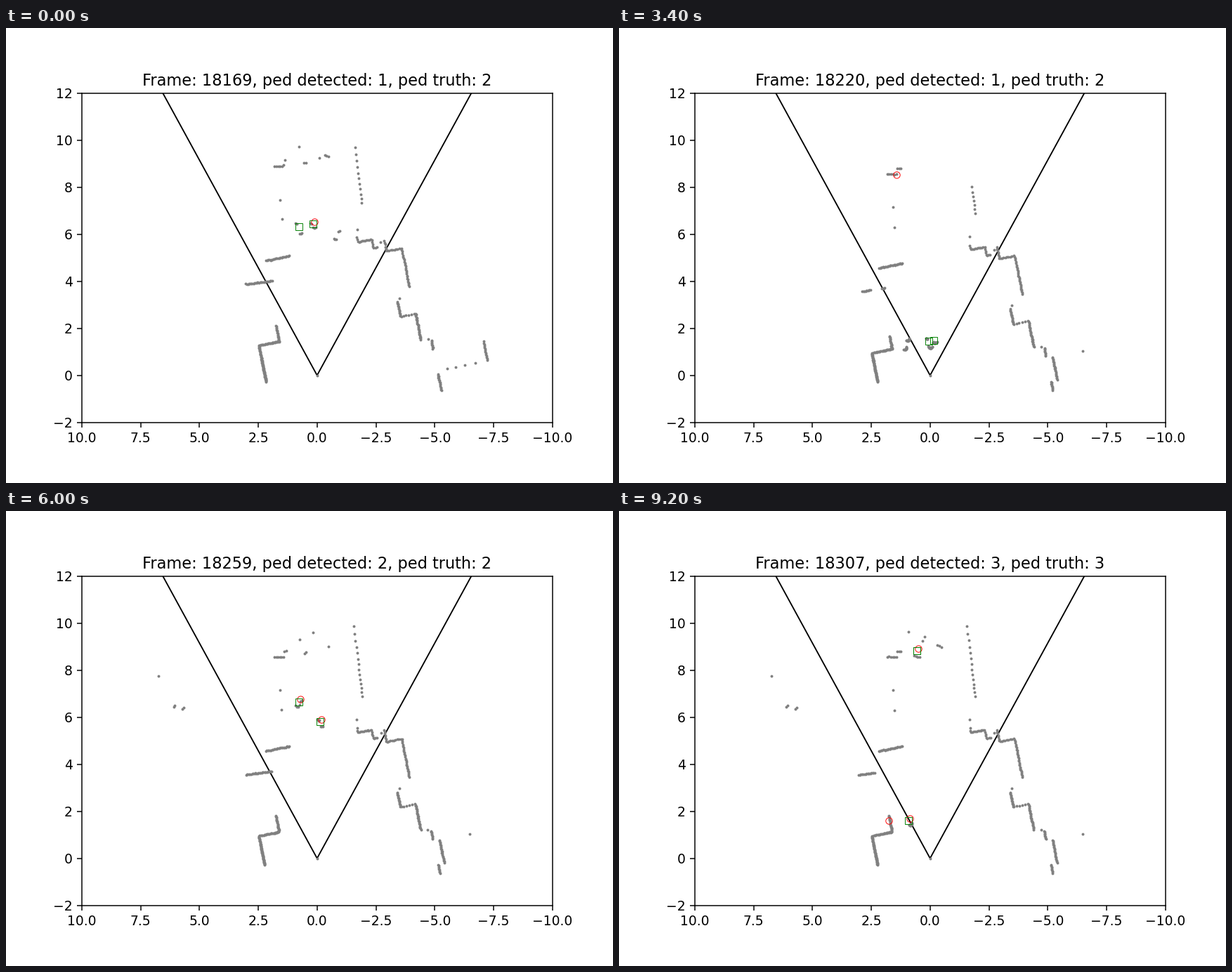
A matplotlib script for the animation above (9.27 s loop, 864 by 648 pixels).

```python
import numpy as np
import matplotlib.pyplot as plt
from matplotlib.animation import FuncAnimation

LOOP, TICK = 9270, 30
FIRST_SCAN = 18169

# The scanner sends one ray every half degree; x grows to the left.
DEG = np.arange(-97, 97.1, .5)
RAYS = np.column_stack([np.sin(np.radians(DEG)), np.cos(np.radians(DEG))])

LABEL_AGE, FOUND_AGE = 2, 10      # scans before a person is marked
LAG = np.array([-.05, .10])       # detector bias
VIEW = .62                        # widest x / y that gets a label
LEG = .09


def wall(x, y, *steps, tilt=.2):
    """Segments from a corner, alternately towards the sensor and rightwards."""
    down = np.array([-tilt, -1]) / np.hypot(tilt, 1)
    right = np.array([-1, tilt]) / np.hypot(tilt, 1)
    corners = [np.array([x, y])]
    for i, s in enumerate(steps):
        corners.append(corners[-1] + s * (right if i % 2 else down))
    return list(zip(corners, corners[1:]))


ROOM = (wall(2.20, 4.56, 0, 1.06)
        + wall(3.07, 3.55, 0, 1.17, tilt=.13)
        + wall(1.76, 1.84, .73, -.88, 1.6)
        + wall(-2.84, 5.48, .53, .66, 1.69)
        + wall(-1.68, 5.60, .25, .60, .38, .20)
        + wall(-3.41, 2.82, .65, .66, 1.15)
        + wall(-4.84, 1.20, .40)
        + wall(-5.14, -.25, .76)
        + wall(-5.60, .85, 0, 1.5, .85, -1.75)
        + wall(-1.56, 9.90, 3.05, tilt=.117)
        + wall(1.84, 8.56, 0, .42, -.25, .26, tilt=0)
        + wall(.56, 8.72, 0, .14)
        + wall(-.30, 9.06, 0, .25, tilt=-.35)
        + wall(6.12, 6.42, 0, .15, tilt=1))
POSTS = [(6.78, 7.80), (5.71, 6.40), (1.58, 7.19), (1.50, 6.32),
         (-1.71, 5.90), (-2.72, 5.36), (-3.50, 2.97), (-4.75, 1.22)]

# Paths of people as (scan, x, y).
WALKERS = [
    [(-4, .79, 6.08), (42, .57, 8.75)],
    [(-31, .29, 4.59), (44, 0, 9.07)],
    [(0, -.83, 6.03), (38, -1.25, 2.03)],
    [(20, 2.20, -.10), (36, 1.75, .55)],
    [(45, 0, .79), (66, .17, 3.10), (90, -.13, 5.81), (121, .14, 8.60),
     (138, .56, 8.83)],
    [(47, -.20, 1.10), (58, -.10, 2.15)],
    [(49, .95, 1.50), (72, 1.85, 0)],
    [(72, .72, 8.55), (138, .92, 1.60)],
    [(130, .70, 8.95), (138, .56, 8.83)],
]
FALSE_ALARMS = [(48, 53, (1.43, 8.53)), (136, 138, (1.76, 1.59))]


def people(k, age=0):
    """Places of those who have been around for at least `age` scans."""
    places = []
    for path in WALKERS:
        ks, xs, ys = zip(*path)
        if ks[0] + age <= k <= ks[-1]:
            places.append(np.array([np.interp(k, ks, xs),
                                    np.interp(k, ks, ys)]))
    return places


def legs(k):
    feet = []
    for i, p in enumerate(people(k)):
        swing = np.array([.06, .2 * np.sin(.5 * k + 1.3 * i + 1.4)])
        feet += [p + swing, p - swing]
    return feet


def cross(a, b):
    return a[..., 0] * b[..., 1] - a[..., 1] * b[..., 0]


def hit_walls(segments, shift):
    p, q = np.array(segments).transpose(1, 0, 2) + [0, shift]
    d, e = RAYS[:, None], (q - p)[None]
    with np.errstate(divide="ignore", invalid="ignore"):
        t = cross(p[None], e) / cross(d, e)
        u = cross(p[None], d) / cross(d, e)
    return np.where((t > 0) & (u >= 0) & (u <= 1), t, np.inf).min(axis=1)


def hit_discs(centres, radii):
    c = np.array(centres)
    along = RAYS @ c.T
    gap = radii ** 2 - (c ** 2).sum(axis=1) + along ** 2
    t = along - np.sqrt(np.maximum(gap, 0))
    return np.where((gap > 0) & (along > 0), t, np.inf).min(axis=1)


def hit_twigs(k):
    rng = np.random.default_rng(k // 15)
    chance, depth = rng.random((2, len(DEG)))
    open_view = (abs(DEG - 2) < 5) & (chance < .25)
    return np.where(open_view, 9.2 + .6 * depth, np.inf)


def scan(k):
    shift = .32 * (1 - min(k / 24, 1)) ** 2
    panel = wall(-5.2, .82, 1.04 * min(k / 51, 1) ** 1.7)
    posts = np.array(POSTS) + [0, shift]
    hits = [hit_walls(ROOM + panel, shift), hit_twigs(k),
            hit_discs(posts, .0046 * np.hypot(*posts.T))]
    feet = legs(k)
    if feet:
        hits.append(hit_discs(feet, np.full(len(feet), LEG)))
    reach = np.min(hits, axis=0)
    reach += np.random.default_rng(k).normal(0, .008, len(reach))
    seen = np.isfinite(reach)
    return np.vstack([RAYS[seen] * reach[seen, None], [(0, 0)]])


def truths(k):
    return [p for p in people(k, LABEL_AGE) if abs(p[0]) < VIEW * p[1]]


def found(k):
    alarms = [p for a, b, p in FALSE_ALARMS if a <= k <= b]
    return [p + LAG for p in people(k, FOUND_AGE)] + alarms


def place(line, pts):
    pts = np.array(pts, float).reshape(-1, 2)
    line.set_data(pts[:, 0], pts[:, 1])


fig, ax = plt.subplots(figsize=(6.4, 4.8), dpi=135)
ax.set_aspect("equal")
ax.set_xlim(10, -10)
ax.set_ylim(-2, 12)
edge = 14 * np.tan(.5)
ax.plot([edge, 0, -edge], [14, 0, 14], "k-", lw=1)
dots, = ax.plot([], [], "o", color="gray", ms=2.1, mew=0)
rings, = ax.plot([], [], "o", mfc="none", mec="red", ms=5, mew=.5)
boxes, = ax.plot([], [], "s", mfc="none", mec="green", ms=5, mew=.5)
title = ax.set_title("")


def draw(tick):
    k = int((tick * TICK + 23.5) * 3 / 200)
    hits, real = found(k), truths(k)
    place(dots, scan(k))
    place(rings, hits)
    place(boxes, real)
    title.set_text(f"Frame: {FIRST_SCAN + k}, ped detected: {len(hits)}, "
                   f"ped truth: {len(real)}")
    return dots, rings, boxes, title


anim = FuncAnimation(fig, draw, frames=LOOP // TICK, interval=TICK,
                     init_func=lambda: draw(0), repeat=True, repeat_delay=0)
plt.show()
```
